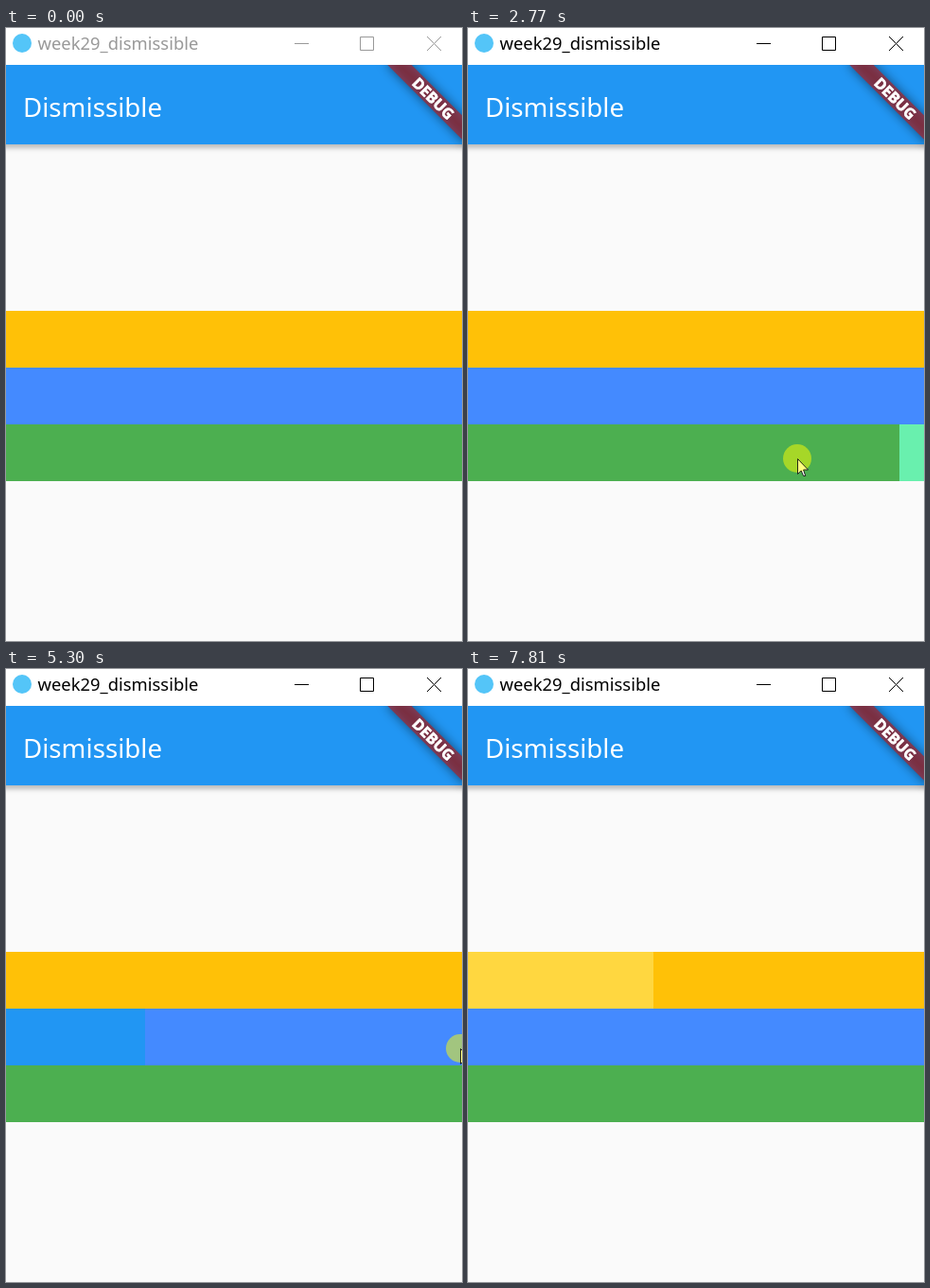
Recreate the animation shown at these times as an HTML page. Size 482 by 648 pixels, loop 8 s.

```html
<!DOCTYPE html>
<html lang="en">
<head>
<meta charset="utf-8">
<title>Dismissible</title>
<style>
  html, body { margin: 0; width: 100%; height: 100%; overflow: hidden; background: #fafafa; }
  svg { display: block; width: 482px; height: 648px; }
  text { font-family: "Noto Sans", "Open Sans", sans-serif; }
  .bar { fill: #2196f3; filter: drop-shadow(0 4.8px 2.7px rgba(0, 0, 0, .25)); }
  .ribbon-shadow { fill: rgba(0, 0, 0, .5); filter: blur(5.7px); }
  .ribbon { fill: rgba(183, 28, 28, .627); }
  .ribbon-text { font-size: 15.8px; font-weight: 900; fill: #fff; stroke: #fff; stroke-width: .7; text-anchor: middle; }
  #chrome { color: #999; }
  #chrome.active { color: #000; }
  #chrome text { font-size: 18.4px; fill: currentColor; }
  #chrome path { fill: none; stroke: currentColor; }
</style>
</head>
<body>
<svg viewBox="0 0 482 648">
  <defs>
    <path id="arrow" d="M.5 .5V16.5L4.2 13L6.6 18.5H8.7L6.6 12H11.5Z"/>
  </defs>

  <rect class="bar" x="-20" y="30" width="522" height="93"/>
  <text x="18" y="94" font-size="27.7" fill="#fff">Dismissible</text>
  <g transform="translate(487.6 38.5) rotate(45)">
    <rect class="ribbon-shadow" x="-60" y="42" width="120" height="18"/>
    <rect class="ribbon" x="-60" y="42" width="120" height="18"/>
    <text class="ribbon-text" x="0" y="56.7">DEBUG</text>
  </g>

  <g id="rows"></g>

  <rect width="482" height="39" fill="#fff"/>
  <circle cx="17" cy="16" r="10" fill="#54c5f8"/>
  <g id="chrome">
    <text x="33.5" y="23">week29_dismissible</text>
    <path d="M305 16.5H320M374.5 9.5H388.5V23.5H374.5ZM445 9L460 24M460 9L445 24"/>
  </g>

  <g id="cursor">
    <use href="#arrow" fill="#fff"/>
    <circle id="press" r="15" fill="#ff0" fill-opacity=".5"/>
    <use href="#arrow" fill="none" stroke="#111" stroke-width=".9"/>
  </g>
</svg>
<script>
  const LOOP = 8000;
  const SNAP_SPEED = 1.28; // px per ms while a released row slides home
  const ENTRY = { x: 500, y: 622 };

  // The pointer sets out at `leave`, grabs the row at (x, y) at `down` and lets go at `up`.
  // Each swing is [start, end, horizontal distance from the grab point].
  const rows = [
    { top: 419, color: '#4caf50', left: '#69f0ae', right: '#69f0ae',
      leave: 230, down: 950, up: 3740, x: 374, y: 467, drift: -14,
      swings: [[1000, 1420, -204], [1680, 2310, 121], [2520, 3060, -207], [3400, 3720, -128]] },
    { top: 359, color: '#448aff', left: '#2196f3', right: '#2196f3',
      leave: 3830, down: 4080, up: 5430, x: 333, y: 402, drift: -1,
      swings: [[4220, 4450, -140], [4650, 4970, 172], [5250, 5330, 137]] },
    { top: 299, color: '#ffc107', left: '#ffd740', right: '#000',
      leave: 5750, down: 6040, up: LOOP, x: 309, y: 340, drift: -15,
      swings: [[6140, 6890, -172], [7130, 7800, 196]] }
  ];

  const byId = id => document.getElementById(id);

  function addRect(y, color) {
    const el = document.createElementNS('http://www.w3.org/2000/svg', 'rect');
    Object.entries({ y, width: 482, height: 60, fill: color })
      .forEach(([key, value]) => el.setAttribute(key, value));
    return byId('rows').appendChild(el);
  }

  for (const row of rows) {
    row.back = addRect(row.top, row.color);
    row.front = addRect(row.top, row.color);
  }

  const mix = (a, b, k) => a + (b - a) * k;

  function ease(t, start, end) {
    const u = Math.min(1, Math.max(0, (t - start) / (end - start)));
    return u * u * (3 - 2 * u);
  }

  const dragAt = (row, t) =>
    row.swings.reduce((dx, [start, end, to]) => mix(dx, to, ease(t, start, end)), 0);

  function handAt(row, t) {
    const settled = row.swings.at(-1)[0];
    return { x: row.x + dragAt(row, t), y: row.y + row.drift * ease(t, row.down, settled) };
  }

  // Glide from the previous release to each grab in turn
  function pointerAt(t) {
    return rows.reduce((from, row) => {
      const hand = handAt(row, t), k = ease(t, row.leave, row.down);
      return { x: mix(from.x, hand.x, k), y: mix(from.y, hand.y, k) };
    }, ENTRY);
  }

  function offsetAt(row, t) {
    const dx = dragAt(row, t);
    const rest = Math.abs(dx) - Math.max(0, t - row.up) * SNAP_SPEED;
    return Math.round(Math.sign(dx) * Math.max(0, rest));
  }

  function draw(t) {
    for (const row of rows) {
      const dx = offsetAt(row, t);
      row.front.setAttribute('x', dx);
      row.back.setAttribute('fill', dx > 0 ? row.left : dx < 0 ? row.right : row.color);
    }
    const { x, y } = pointerAt(t);
    byId('cursor').setAttribute('transform', `translate(${Math.round(x)} ${Math.round(y)})`);
    const pressed = rows.some(row => t >= row.down && t < row.up);
    byId('press').setAttribute('visibility', pressed ? 'visible' : 'hidden');
    byId('chrome').classList.toggle('active', t >= rows[0].down);
  }

  const start = performance.now();
  function tick() {
    draw((performance.now() - start) % LOOP);
    requestAnimationFrame(tick);
  }
  tick();
</script>
</body>
</html>
```
